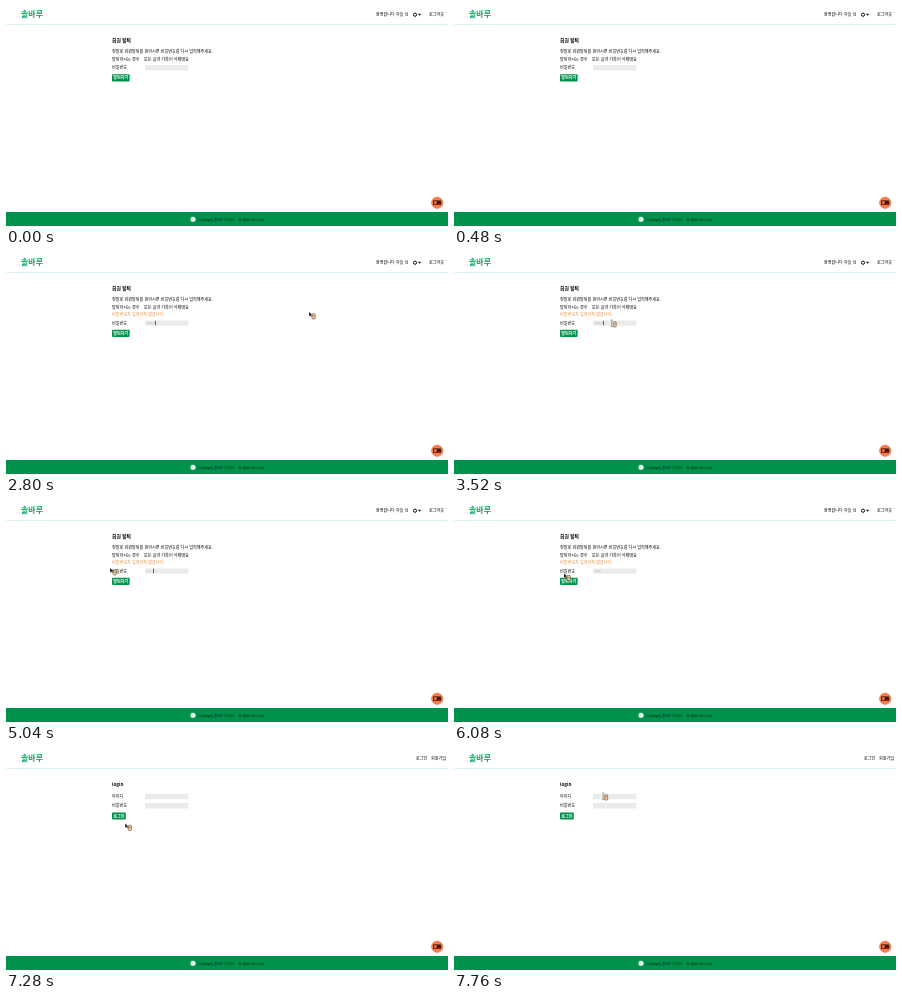
These frames come from a looping animation (442x220 px, 8000 ms). An HTML page:

```html
<!DOCTYPE html>
<html lang="ko">
<head>
<meta charset="utf-8">
<style>
  html, body { margin: 0; width: 100%; height: 100%; overflow: hidden; background: #fff; }
  svg { display: block; width: 100%; height: 100%; }
  text { font: 500 4.1px "Noto Sans CJK KR", "Noto Sans CJK", "Noto Sans", sans-serif; fill: #000; white-space: pre; }
  .bold { font-weight: 700; }
  .brand { font-size: 8px; font-weight: 700; fill: #14a561; }
  .error { fill: #dd8a3c; }
  .foot { font-size: 3.3px; fill: #00210f; }
  .label { fill: #fff; font-weight: 700; }
  .field { fill: #ebebeb; }
  .button { fill: #00924c; }
</style>
</head>
<body>
<svg viewBox="0 0 442 220" preserveAspectRatio="none">
  <rect width="442" height="220" fill="#fff"/>
  <rect y="18" width="442" height="1" fill="#daf5ee"/>
  <text class="brand" x="15" y="11">솔바루</text>

  <g id="leave">
    <text x="370" y="10.3">환영합니다 하늘 님</text>
    <circle cx="409" cy="8.7" r="1.6" fill="none" stroke="#111" stroke-width="1"/>
    <path d="M411.8 7.8h3.4l-1.7 2z" fill="#111"/>
    <text x="423" y="10.3">로그아웃</text>
    <text class="bold" x="106" y="36.2" style="font-size:4.8px">회원 탈퇴</text>
    <text x="106" y="47.4">정말로 회원탈퇴를 원하시면 비밀번호를 다시 입력해주세요.</text>
    <text x="106" y="54.9">탈퇴하시는 경우</text>
    <text x="138" y="54.9">모든 글과 기록이 삭제돼요</text>
    <text id="error" class="error" x="106" y="62.2">비밀번호가 일치하지 않습니다.</text>
    <g id="form">
      <text x="106" y="63.2">비밀번호</text>
      <rect class="field" x="139" y="59" width="43.5" height="5.4" rx=".5"/>
      <g id="dots" fill="#888"></g>
      <rect id="caret" y="59.3" width=".7" height="4.6" fill="#222"/>
      <rect class="button" x="106" y="68.3" width="17.6" height="7.2" rx=".8"/>
      <text class="label" x="107.2" y="73.4">탈퇴하기</text>
    </g>
  </g>

  <g id="login">
    <text x="410" y="10.3">로그인</text>
    <text x="425" y="10.3">회원가입</text>
    <text class="bold" x="106" y="36" style="font-size:4.6px">login</text>
    <text x="106" y="48.1">아이디</text>
    <rect class="field" x="139" y="43.8" width="43.5" height="5.4" rx=".5"/>
    <text x="106" y="57.2">비밀번호</text>
    <rect class="field" x="139" y="53" width="43.5" height="5.4" rx=".5"/>
    <rect class="button" x="106" y="62.4" width="13.8" height="7.2" rx=".8"/>
    <text class="label" x="107.2" y="67.5">로그인</text>
  </g>

  <rect y="206" width="442" height="14" fill="#00924c"/>
  <circle cx="187" cy="213.3" r="2.6" fill="#e4f4ec"/>
  <text class="foot" x="192" y="214.6">Copyright 솔바루 ©2023</text>
  <text class="foot" x="232.5" y="214.6" style="font-size:2.85px">All Rights Reserved</text>

  <circle cx="431.2" cy="196.8" r="5.7" fill="#f57f4c" stroke="#e0683c" stroke-width=".5"/>
  <rect x="427.6" y="194.8" width="3.4" height="3.6" fill="#f57f4c" stroke="#4a150c" stroke-width=".9"/>
  <rect x="431" y="194.4" width="4.2" height="4.4" rx=".4" fill="#4a150c"/>

  <g id="pointer">
    <rect x="3.2" y="1.8" width="3" height="5.2" rx=".8" fill="#f3d9b8" stroke="#5a3a22" stroke-width=".6"/>
    <rect x="3.6" y="3.4" width="2.2" height="1.2" fill="#d9822f"/>
    <path id="arrow" d="M0 0v4.2l1.1-.9 .8 1.7 .8-.4-.8-1.6h1.4z" fill="#222"/>
    <path id="beam" d="M.6 0h2.2M1.7 0v6.6M.6 6.6h2.2" fill="none" stroke="#444" stroke-width=".45"/>
  </g>
</svg>
<script>
const LOOP = 8000, STEP = 80, SHIFT = 2800, SWITCH = 6960;
const $ = id => document.getElementById(id);
const show = (id, on) => $(id).style.display = on ? '' : 'none';

// time, x, y
const path = [
  [720, 161, 57.5], [800, 163, 58], [880, 163, 58], [1120, 303, 58],
  [3040, 303, 58], [3520, 156, 66], [3600, 156, 66], [3920, 104, 66],
  [5920, 104, 66], [6240, 116, 77], [7200, 116, 77], [7600, 146.5, 43], [7680, 146.5, 43], [7760, 147.5, 43]
];
const first = [1600, 1680, 1760, 1920, 2000, 2080, 2160, 2320];
const retry = [4400, 4560, 4800, 4960, 5120, 5200];

const dots = first.map((_, i) => {
  const dot = document.createElementNS('http://www.w3.org/2000/svg', 'circle');
  dot.setAttribute('cx', 141.4 + i * 1.05);
  dot.setAttribute('cy', 61.7);
  dot.setAttribute('r', .38);
  return $('dots').appendChild(dot);
});

function position(t) {
  const next = path.findIndex(p => p[0] > t);
  if (next < 0) return path[path.length - 1].slice(1);
  if (next === 0) return path[0].slice(1);
  const [t0, x0, y0] = path[next - 1], [t1, x1, y1] = path[next];
  const k = (t - t0) / (t1 - t0), e = k * k * (3 - 2 * k);
  return [x0 + (x1 - x0) * e, y0 + (y1 - y0) * e];
}

function render(time) {
  const t = Math.floor(time / STEP) * STEP;
  const shifted = t >= SHIFT;
  show('leave', t < SWITCH);
  show('login', t >= SWITCH);
  show('error', shifted);
  $('form').setAttribute('transform', `translate(0 ${shifted ? 7.4 : 0})`);

  const keys = t < retry[0] ? first : retry;
  const count = keys.filter(k => k <= t).length;
  dots.forEach((dot, i) => dot.style.display = i < count ? '' : 'none');

  show('caret', shifted && t < 6000 && (t < 4400 || t >= 4960));
  $('caret').setAttribute('x', t < 4400 || t >= 5520 ? 149 : 147);

  const [x, y] = position(t);
  const overField = t < 880 || (t >= 3440 && t < 3680) || t >= 7520;
  show('pointer', t >= 720);
  show('arrow', !overField);
  show('beam', overField);
  $('pointer').setAttribute('transform', `translate(${x} ${y})`);
}

const start = performance.now();
function tick() {
  render((performance.now() - start) % LOOP);
  requestAnimationFrame(tick);
}
tick();
</script>
</body>
</html>
```
